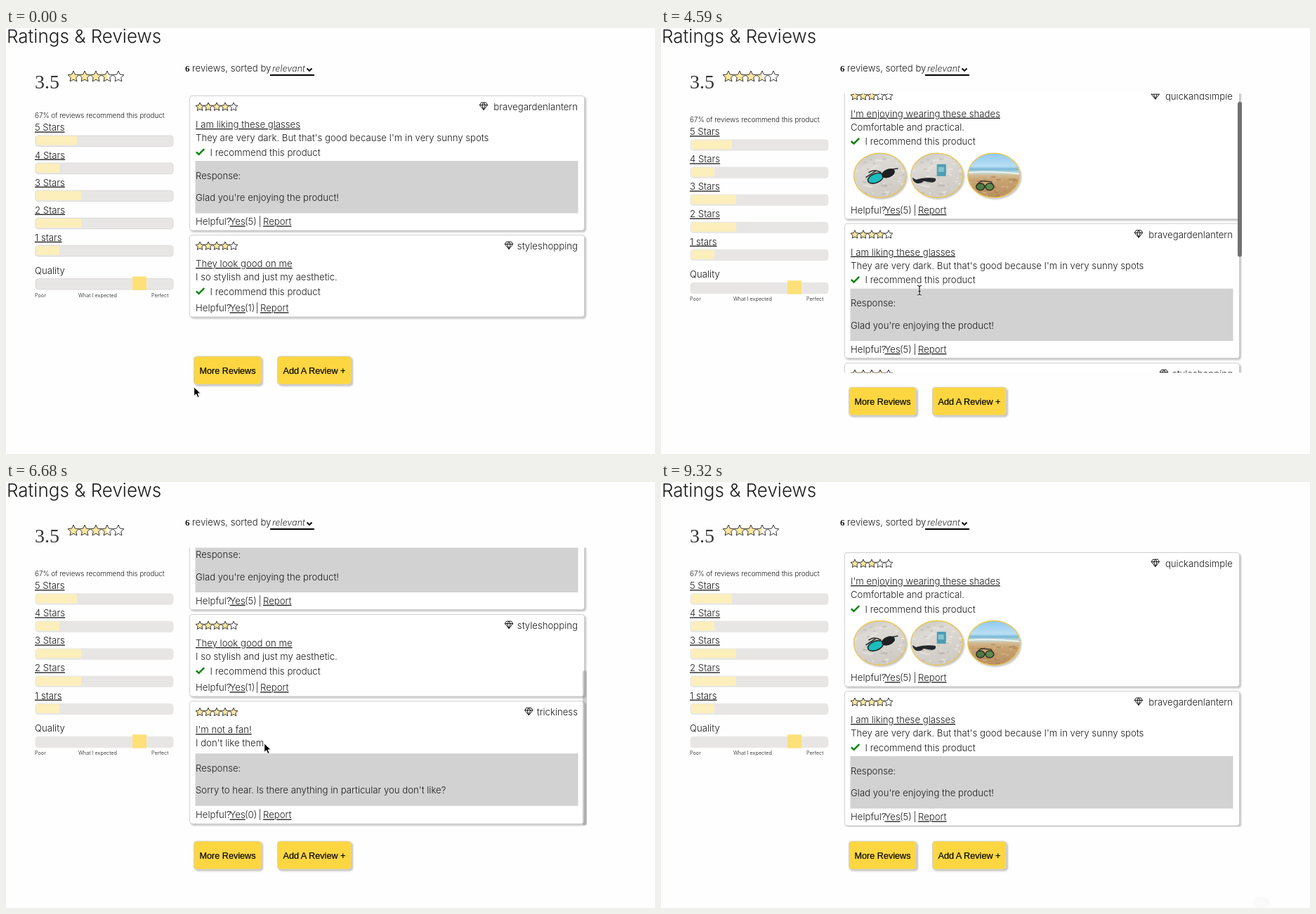
An HTML page for the animation above (9.9 s loop, 924 px wide and 606 px high).

```html
<!DOCTYPE html>
<html lang="en">
<head>
<meta charset="utf-8">
<title>Ratings &amp; Reviews</title>
<style>
  html, body { margin: 0; width: 100%; height: 100%; overflow: hidden; background: #fefefe; }
  svg { display: block; width: 924px; height: 606px; }
  text { font: 300 13.2px Inter, "Open Sans", sans-serif; fill: #1c1c1c; white-space: pre; }
  .link { text-decoration: underline; text-underline-offset: 2px; }
  .button { font: 12.65px "Liberation Sans", Arial, sans-serif; fill: #000; stroke: #000; stroke-width: .2; }
  .serif { font-family: "Liberation Serif", "Times New Roman", serif; }
  .raised { filter: drop-shadow(2px 2px 1px #c2c2c2); }
</style>
</head>
<body>
<svg viewBox="0 0 924 606" xmlns="http://www.w3.org/2000/svg">
  <defs>
    <clipPath id="listClip"><rect x="250" y="93.5" width="600" height="397"/></clipPath>
    <clipPath id="photoClip"><ellipse rx="37" ry="31.5"/></clipPath>
    <linearGradient id="sand" x2=".4" y2="1">
      <stop stop-color="#c4c2bd"/><stop offset=".35" stop-color="#dddad5"/><stop offset="1" stop-color="#d0cbc5"/>
    </linearGradient>
    <linearGradient id="beach" x2="0" y2="1">
      <stop stop-color="#8fc8f2"/><stop offset=".3" stop-color="#b9dff4"/><stop offset=".36" stop-color="#79b8d8"/>
      <stop offset=".44" stop-color="#c5dcdd"/><stop offset=".49" stop-color="#d3bd98"/><stop offset=".6" stop-color="#c9a373"/>
      <stop offset="1" stop-color="#b98e5e"/>
    </linearGradient>
    <path id="beamPath" d="M-3 -6.5Q-.3 -6.5 0 -5Q.3 -6.5 3 -6.5M0 -5V5.5M-3 7Q-.3 7 0 5.5Q.3 7 3 7M-1.6 1.5H1.6"/>
  </defs>
  <g id="page"></g>
  <rect id="thumb" x="821" width="6" height="220.5" rx="3" fill="#717171"/>
  <ellipse id="smudge" cx="855" cy="598" rx="12" ry="8" fill="#fafafa"/>
  <g id="arrow" stroke-linejoin="round">
    <path d="M.7 .7V13.6L3.7 10.8L5.9 15.6L8.2 14.6L6.1 9.9H10.3Z" fill="#000" stroke="#fff"/>
  </g>
  <g id="hand" stroke-linejoin="round">
    <path d="M3.2 1.2Q4.6 .1 5.4 1.7L6.7 5.2Q8 4.2 8.8 5.3Q10 4.4 10.9 5.6Q12.4 5 13 6.7L14 10.2Q14.2 12.2 12.8 13.4L12.5 15L6.6 15.5L6 14Q3.6 12.2 1.3 9.8Q.5 8.2 2.2 8Q3.4 8.2 4.7 9.4L2.7 3.1Q2.4 1.9 3.2 1.2Z" fill="#fff" stroke="#000"/>
    <path d="M7.7 9.4L8.5 12.4M9.6 9L10.3 12M11.4 8.6L12 11.6" stroke="#000" stroke-width=".7"/>
  </g>
  <g id="beam" fill="none">
    <use href="#beamPath" stroke="#fff" stroke-width="2.6"/>
    <use href="#beamPath" stroke="#000" stroke-width="1.1"/>
  </g>
</svg>
<script>
const LOOP = 9900, STEPS = 67;
const $ = id => document.getElementById(id);

const cards = {
  shades: { height: 191, stars: 3, name: 'quickandsimple', gem: 697.5, title: "I'm enjoying wearing these shades",
    body: 'Comfortable and practical.', recommended: true, photos: true, votes: 5 },
  glasses: { height: 192, stars: 4, name: 'bravegardenlantern', gem: 673.7, title: 'I am liking these glasses',
    body: "They are very dark. But that's good because I'm in very sunny spots", recommended: true,
    reply: "Glad you're enjoying the product!", votes: 5 },
  look: { height: 117, stars: 4, name: 'styleshopping', gem: 709.7, title: 'They look good on me',
    body: 'I so stylish and just my aesthetic.', recommended: true, votes: 1 },
  fan: { height: 175, stars: 5, name: 'trickiness', gem: 738, title: "I'm not a fan!",
    body: "I don't like them.", reply: "Sorry to hear. Is there anything in particular you don't like?", votes: 0 }
};

const text = (x, y, content, attrs = '') => `<text x="${x}" y="${y}" ${attrs}>${content}</text>`;
const link = (x, y, content) => text(x, y, content, 'class="link"');
const sized = (x, y, content, size) => text(x, y, content, `style="font-size:${size}px"`);
const at = (x, y, content) => `<g transform="translate(${x} ${y})">${content}</g>`;

function star(cx, cy, r, part) {
  const points = Array.from({ length: 10 }, (_, i) => {
    const radius = i % 2 ? r * .48 : r, angle = i * Math.PI / 5;
    return `${(cx + radius * Math.sin(angle)).toFixed(2)} ${(cy - radius * Math.cos(angle)).toFixed(2)}`;
  });
  const path = (list, attrs) => `<path d="M${list.join('L')}Z" ${attrs}/>`;
  const leftHalf = [points[0], ...points.slice(5)];
  return path(points, 'fill="#fff"')
    + (part > 0 ? path(part < 1 ? leftHalf : points, 'fill="#fce7a0"') : '')
    + path(points, 'fill="none" stroke="#222" stroke-width=".9" stroke-linejoin="round"');
}

const starRow = (x, y, pitch, r, score) =>
  [0, 1, 2, 3, 4].map(i => star(x + i * pitch, y, r, score - i)).join('');

// Seeded light and dark grains for the sand in the photos.
function grains(count, top, colors) {
  let seed = 7, out = '';
  const random = () => (seed = seed * 16807 % 2147483647) / 2147483647;
  for (let i = 0; i < count; i++) {
    out += `<ellipse cx="${(random() * 76 - 38).toFixed(1)}" cy="${(top + random() * (32 - top)).toFixed(1)}"
      rx="${(1 + random() * 3).toFixed(1)}" ry="1.2" fill="${colors[i % 2]}" opacity=".5"/>`;
  }
  return out;
}

function photo(x, kind) {
  const paleGrains = grains(70, -32, ['#f3f1ee', '#b5b1aa']);
  const scene = [
    paleGrains + `<path d="M-16 -4Q-8 -10 2 -4M14 -8L26 -10M-20 3L-6 -6" stroke="#2a2a2a" stroke-width="1.6" fill="none"/>
      <ellipse cx="-6" cy="4" rx="11.5" ry="6.5" transform="rotate(-22 -6 4)" fill="#1bbdbd" stroke="#1d2a2c" stroke-width="1.6"/>
      <ellipse cx="12" cy="-3" rx="10" ry="6" transform="rotate(-22 12 -3)" fill="#1e2022"/>`,
    paleGrains + `<path d="M-35 3L-30 6Q-18 2 -2 4Q0 9 -7 10Q-14 9 -19 8Q-22 12 -29 11Q-34 9 -35 3Z" fill="#25282c"/>
      <rect x="0" y="-16" width="13" height="17" rx="1" fill="#4d9db3"/><rect x="2" y="-12" width="8" height="7" fill="#86c4d2"/>`,
    grains(50, 2, ['#dcbf94', '#a37a4d']) + `<path d="M-37 -4Q0 -7 37 -2" stroke="#e9f1ee" stroke-width="2" fill="none"/>
      <path d="M-24 13L-18 8L-4 9L-1 14" stroke="#2b2b22" stroke-width="1.3" fill="none"/>
      <ellipse cx="-19" cy="16" rx="6" ry="5" fill="#4c7a42" stroke="#2b2b22" stroke-width="1.4"/>
      <ellipse cx="-6" cy="16" rx="6" ry="5" fill="#5f8a49" stroke="#2b2b22" stroke-width="1.4"/>`
  ][kind];
  return at(x, 129, `<ellipse class="raised" rx="37.5" ry="32" fill="#ddd"/>
    <g clip-path="url(#photoClip)"><rect x="-38" y="-32" width="76" height="64" fill="url(#${kind === 2 ? 'beach' : 'sand'})"/>${scene}</g>
    <ellipse rx="37" ry="31.5" fill="none" stroke="#ecc64f" stroke-width="1.3"/>`);
}

function card(c, y) {
  const boxTop = c.recommended ? 93 : 75, foot = c.height - 7.7;
  let out = `<rect class="raised" x="261.5" y=".5" width="562" height="${c.height - .5}" rx="3.5" fill="#fff" stroke="#cfcfcf"/>`;
  out += starRow(276, 16.3, 12, 6.3, c.stars);
  out += at(c.gem, 9.5, `<path d="M2.8 .6H9.8L12 4L6.3 11L.6 4ZM.6 4H12M6.3 .6L4 4L6.3 11L8.6 4Z"
    fill="none" stroke="#111" stroke-linejoin="round"/>`);
  out += text(814, 21.3, c.name, 'text-anchor="end"') + link(270, 46, c.title) + text(270, 65.3, c.body);
  if (c.recommended) {
    out += '<path d="M270.8 80.3L274.6 83.8L282.2 76.2" fill="none" stroke="#0b840b" stroke-width="2.5"/>';
    out += text(290.5, 85.8, 'I recommend this product');
  }
  if (c.photos) out += [311.5, 392.8, 473.8].map(photo).join('');
  if (c.reply) {
    out += `<rect x="269.5" y="${boxTop}" width="545" height="74.5" fill="#d2d2d2"/>`;
    out += text(270, boxTop + 25.5, 'Response:') + text(270, boxTop + 57.2, c.reply);
  }
  const reportX = c.votes === 1 ? 362 : 366;
  out += text(270, foot, 'Helpful?') + link(318.5, foot, 'Yes') + text(340, foot, `(${c.votes})`)
    + text(reportX - 6.5, foot, '|') + link(reportX, foot, 'Report');
  return at(0, y, out);
}

function button(x, width, y, label) {
  return `<rect class="raised" x="${x}" y="${y}" width="${width}" height="40" rx="4" fill="#fdd641" stroke="#d4d2cc"/>`
    + text(x + width / 2, y + 24.6, label, 'class="button" text-anchor="middle"');
}

const buttons = y => button(267.5, 96, y, 'More Reviews') + button(386.5, 105, y, 'Add A Review +');

function summary(outline) {
  const track = y => `<rect x="42" y="${y}" width="196" height="15.5" rx="4" fill="#e8e6e5" stroke="${outline}" stroke-width=".8"/>`;
  let out = sized(41, 128, '67% of reviews recommend this product', 9.8);
  [58, 33, 64, 64, 33].forEach((width, i) => {
    const y = 153 + i * 39.1;
    out += link(41, y - 6.6, i < 4 ? `${5 - i} Stars` : '1 stars') + track(y);
    out += `<rect x="43" y="${y + .6}" width="${width}" height="13" rx="2" fill="#fcefbc"/>`;
  });
  out += text(41, 349.5, 'Quality') + track(356.5) + '<rect x="180" y="353.5" width="20" height="19.3" fill="#fee078"/>';
  return out + sized(41, 382.7, 'Poor', 7.3) + sized(103, 382.7, 'What I expected', 7.3) + sized(207, 382.7, 'Perfect', 7.3);
}

$('page').innerHTML = sized(1, 21.3, 'Ratings &amp; Reviews', 26)
  + text(41, 86, '3.5', 'class="serif" style="font-size:28px;font-weight:400;fill:#333"')
  + starRow(96, 69.3, 16, 8.3, 3.5)
  + text(255, 62, '6', 'class="serif" style="font-weight:700"') + text(265, 62, 'reviews, sorted by')
  + text(379, 62, 'relevant', 'style="font-style:italic;font-size:12.6px;fill:#333"')
  + '<path d="M376 67H439" stroke="#000" stroke-width="2.2"/><path d="M428.5 57.5L432 61L435.5 57.5" fill="none" stroke="#000" stroke-width="1.8"/>'
  + `<g id="short">${summary('#d8d5d5')}${card(cards.glasses, 96)}${card(cards.look, 294)}${buttons(467)}</g>`
  + `<g id="long">${at(0, 5.8, summary('#e8e6e5'))}
      <g clip-path="url(#listClip)"><g id="list">${card(cards.shades, 100)}${card(cards.glasses, 297)}${card(cards.look, 495.5)}${card(cards.fan, 618.7)}</g></g>
      ${buttons(511)}</g>`;

// Keys are [step, value, ...]; values are interpolated linearly.
function tween(keys, step, column = 1) {
  const next = keys.findIndex(key => key[0] > step);
  if (next === 0) return keys[0][column];
  if (next < 0) return keys[keys.length - 1][column];
  const a = keys[next - 1], b = keys[next];
  return a[column] + (b[column] - a[column]) * (step - a[0]) / (b[0] - a[0]);
}

const pointer = [[0, 267, 510], [1, 209, 509], [2, 209, 509], [4, 238, 480], [7, 325, 385], [10, 387, 314], [12, 384, 291],
  [14, 358, 410], [15, 340, 523], [16, 331, 514], [17, 326, 497], [24, 326, 497], [27, 352, 425], [29, 368, 373],
  [44, 368, 373], [45, 367, 371], [55, 367, 371], [57, 326, 412], [59, 470, 500], [62, 850, 590]];
const scroll = [[30, 0], [31, 19.3], [34, 85], [38, 189], [41, 307.5], [45, 307.5], [46, 280], [47, 212], [48, 143],
  [49, 84], [50, 50], [51, 28], [52, 14], [53, 5], [54, 0]];
const thumbAlpha = [[30, 0], [31, 1], [43, 1], [45, .35], [46, 1], [56, 1], [58, 0]];

const show = (id, visible) => $(id).setAttribute('visibility', visible ? 'visible' : 'hidden');
const move = (id, x, y) => $(id).setAttribute('transform', `translate(${x} ${y})`);
const start = performance.now();

function draw() {
  const step = Math.floor((performance.now() - start) % LOOP / LOOP * STEPS);
  const offset = tween(scroll, step);
  show('short', step < 24);
  show('long', step >= 24);
  move('list', 0, -offset);
  $('thumb').setAttribute('y', 94 + offset * .566);
  $('thumb').setAttribute('opacity', tween(thumbAlpha, step));
  show('smudge', step >= 62);

  const shape = step >= 63 ? '' : step >= 17 && step < 24 ? 'hand' : step >= 28 && step < 45 ? 'beam' : 'arrow';
  for (const id of ['arrow', 'hand', 'beam']) {
    show(id, id === shape);
    move(id, tween(pointer, step, 1), tween(pointer, step, 2));
  }
  requestAnimationFrame(draw);
}
draw();
</script>
</body>
</html>
```
